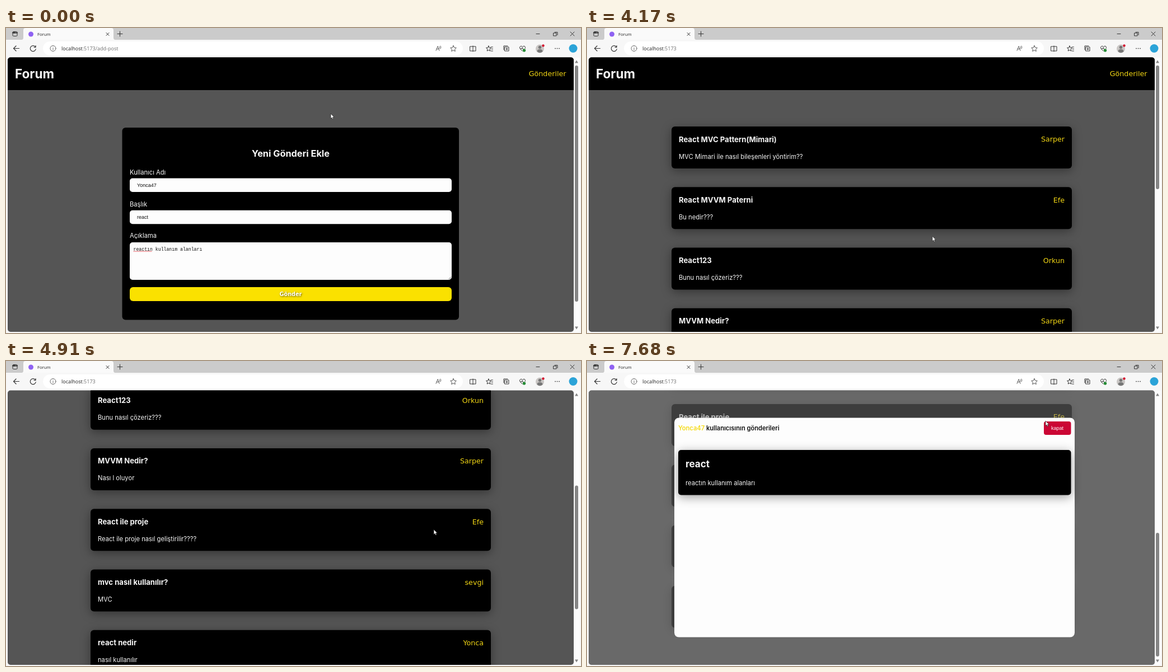
Write an HTML page that moves like this. It is 1027x545 px and loops after 8 s.

```html
<!DOCTYPE html>
<html lang="tr">
<head>
<meta charset="utf-8">
<title>Forum</title>
<style>
  html, body { margin: 0; height: 100%; overflow: hidden; background: #f7f7f7; }
  svg { display: block; width: 100vw; height: 100vh; }
  text { font: 11.2px Inter, sans-serif; fill: #f7f7f7; white-space: pre; }
  .ui { font: 9px "Open Sans", sans-serif; fill: #222; }
  .ui tspan { fill: #707070; }
  .title { font-weight: 700; font-size: 13.1px; }
  .link { font: 12.7px "DejaVu Sans", sans-serif; fill: #f0d414; text-anchor: end; }
  .field { font: 9px "Liberation Sans", Arial, sans-serif; fill: #111; }
  .mono { font: 8.2px "Liberation Mono", monospace; fill: #111; }
  .mid { text-anchor: middle; }
  .shadow { filter: drop-shadow(0 4px 9px rgba(0, 0, 0, .38)); }
  .icon { fill: none; stroke: #333; stroke-width: 1; stroke-linecap: round; stroke-linejoin: round; }
  #send text { font: 700 9.7px "DejaVu Sans", sans-serif; fill: #fff; text-shadow: 1px 1px 3px rgba(0, 0, 0, .6); }
</style>
</head>
<body>
<svg viewBox="0 0 1027 545">
  <defs>
    <clipPath id="view"><rect x="3" y="52.5" width="1011" height="490.5" rx="5"/></clipPath>
  </defs>

  <!-- browser chrome -->
  <rect width="1027" height="545" fill="#f7f7f7"/>
  <rect width="1027" height="21" fill="#cbcbcb"/>
  <path d="M28 21q3 0 3-4V4q0-4 4-4H188q4 0 4 4v13q0 4 3 4z" fill="#fafafa"/>
  <rect x="66" y="24" width="750" height="25" rx="12.5" fill="#fff"/>
  <circle cx="44.5" cy="11" r="4.5" fill="#8f62f2"/>
  <text class="ui" x="56" y="13.6" style="font-size:7.7px">Forum</text>
  <text class="ui" x="99" y="40">localhost<tspan id="path"></tspan></text>
  <g class="icon">
    <rect x="12" y="6.500" width="8" height="8" rx="1.500"/>
    <path d="M12 8.500h8M14.500 7v2" stroke-width="2"/>
    <path d="M179 8.500l5 5m0-5l-5 5M203.500 6v9M199 10.500h9M947 10.500h6M1008 7l7 7m0-7l-7 7"/>
    <path d="M978 9h5v5h-5zM980 7.500h5v5"/>
    <path d="M23.500 36.500h-10m4.500-4.500l-4.500 4.500 4.500 4.500" stroke-width="1.200"/>
    <path d="M52.500 34a5 5 0 1 0 .7 3.500M53 31.500v3h-3" stroke-width="1.200"/>
    <g stroke="#666">
      <circle cx="84" cy="36.500" r="5"/>
      <path d="M84 36v3M84 33.900v.1"/>
      <path d="M768 40.500l3-8 3 8m-5-3h4M774 33q1.500 1.500 0 3.500M776 32q2 2.500 0 5"/>
    </g>
    <path id="star" d="M799 31.500l1.600 3.400 3.700.5-2.700 2.500.7 3.700-3.300-1.800-3.300 1.800.7-3.700-2.700-2.500 3.700-.5z" stroke="#555"/>
    <path d="M834 32v10m-5-9h10v8h-10z"/>
    <path d="M862 32l1.300 3 3.200.4-2.400 2 .6 3.600-2.700-1.500-2.700 1.500.6-3.600-2.400-2 3.200-.4zM866 34h3.500M867 37.500h2.500M866 41h3.500"/>
    <path d="M891 34h7v7h-7zM889 39v-7h7M894.500 35.800v3.400m-1.700-1.700h3.400"/>
    <path d="M922 41l-4-4.200q-1.500-3 1-4.300 2-.7 3.500 1.300 1.500-2 3.500-1.300 2.500 1.300 1 4.300M919 37h2l1-2 1.500 3"/>
    <path d="M981 36.500h.1m3.400 0h.1m3.400 0h.1" stroke-width="1.700"/>
  </g>
  <circle cx="925.500" cy="40" r="2.700" fill="#258b35"/>
  <circle cx="953.500" cy="37" r="7.500" fill="#c9c6c4"/>
  <path d="M948.500 42q0-4 5-4t5 4q-5 4.500-10 0z" fill="#777"/>
  <circle cx="953.500" cy="34.500" r="2.700" fill="#777"/>
  <circle cx="959.500" cy="31.500" r="2.200" fill="#d3122f"/>
  <circle cx="1013" cy="36.500" r="7.500" fill="#2ba3d8"/>

  <!-- scrollbar -->
  <rect x="1014" y="53" width="11" height="490" fill="#fcfcfc"/>
  <path d="M1016 62.500l3-5 3 5zM1016 533.500l3 5 3-5z" fill="#858585"/>
  <rect id="thumb" x="1016" width="6" rx="3" fill="#858585"/>

  <!-- page -->
  <g clip-path="url(#view)">
    <rect y="52" width="1027" height="493" fill="#555"/>
    <g id="page">
      <rect y="52" width="1027" height="59"/>
      <text x="16" y="89.700" style="font-weight:700;font-size:22.500px">Forum</text>
      <text class="link" x="1000.500" y="86.300">Gönderiler</text>
      <g id="form">
        <rect x="207.500" y="178" width="601.500" height="343.500" rx="6"/>
        <text class="title mid" x="508.500" y="229.500" style="font-size:16.300px">Yeni Gönderi Ekle</text>
        <text x="221" y="261.500">Kullanıcı Adı</text>
        <text x="221" y="318.500">Başlık</text>
        <text x="221" y="375.300">Açıklama</text>
        <g fill="#fdfdfd">
          <rect x="221" y="268.500" width="575" height="24.500" rx="5"/>
          <rect x="221" y="325.700" width="575" height="24.500" rx="5"/>
          <rect x="221" y="383" width="575" height="67" rx="5"/>
        </g>
        <text class="field" x="234" y="283.700">Yonca47</text>
        <text class="field" x="234" y="340.500">react</text>
        <text class="mono" x="227.500" y="397.500">reactın kullanım alanları</text>
        <path id="squiggle" fill="none" stroke="#e0303a" stroke-width=".8"/>
        <path d="M790.500 449l4.500-4.500m-1.800 4.500l1.800-1.800" stroke="#555" stroke-width=".8"/>
        <g id="send">
          <rect x="221" y="463" width="575" height="25" rx="6" fill="#fae100"/>
          <text class="mid" x="508.500" y="479.200">Gönder</text>
        </g>
      </g>
      <g id="list"></g>
    </g>
    <g id="modal">
      <rect y="52" width="1027" height="493" fill="rgba(128,128,128,.48)"/>
      <rect x="156" y="101.500" width="715" height="392" rx="8" fill="#fdfdfd"/>
      <text x="163" y="124" style="font-weight:600;font-size:11.100px;fill:#111"><tspan fill="#f5db18">Yonca47</tspan> kullanıcısının gönderileri</text>
      <rect x="816" y="108" width="48.500" height="24" rx="4" fill="#cb0634"/>
      <text class="field mid" x="840" y="122.700" style="fill:#fff">kapat</text>
      <rect class="shadow" x="163" y="159" width="701.500" height="80.500" rx="5"/>
      <text class="title" x="176" y="190" style="font-size:17px">react</text>
      <text x="176" y="222">reactın kullanım alanları</text>
    </g>
  </g>

  <!-- pointers, each with its hot spot at 0,0 -->
  <g id="pointer" stroke="#222" stroke-width=".7" stroke-linejoin="round" fill="#fff">
    <path id="arrow" d="M0 0v8.800l2-1.800 1.400 3 1.500-.7-1.400-2.900h2.700z"/>
    <path id="hand" d="M-1 .5q1-1.300 2 0v4l3.300.8q1.200.4 1 1.800l-.8 4.900h-5l-3-4q-.5-1.200.8-1.200l1.700 1.200z"/>
  </g>
</svg>

<script>
const LOOP = 8000, MAX_SCROLL = 532;
const PRESS = 3070, SENT = 3140, MODAL = 6110;
const $ = id => document.getElementById(id);
const show = (id, on) => $(id).setAttribute('display', on ? 'inline' : 'none');

const posts = [
  ['React MVC Pattern(Mimari)', 'MVC Mimari ile nasıl bileşenleri yöntirim??', 'Sarper'],
  ['React MVVM Paterni', 'Bu nedir???', 'Efe'],
  ['React123', 'Bunu nasıl çözeriz???', 'Orkun'],
  ['MVVM Nedir?', 'Nası l oluyor', 'Sarper'],
  ['React ile proje', 'React ile proje nasıl geliştirilir????', 'Efe'],
  ['mvc nasıl kullanılır?', 'MVC', 'sevgi'],
  ['react nedir', 'nasıl kullanılır', 'Yonca'],
  ['react', 'reactın kullanım alanları', 'Yonca47']
];
$('list').innerHTML = posts.map(([title, body, user], i) => `
  <g transform="translate(151 ${176 + i * 108.25})">
    <rect class="shadow" width="715" height="75" rx="6"/>
    <text class="title" x="13" y="27.500">${title}</text>
    <text x="13" y="57.500">${body}</text>
    <text class="link" x="702" y="27.300">${user}</text>
  </g>`).join('');
$('squiggle').setAttribute('d', 'M227.500 400' + 'l1.500-1.500 1.500 1.500'.repeat(11));

// Keys are [time, ...values]
const scrollKeys = [[4380, 0], [4510, 95], [4770, 290], [4840, 290], [4910, 344], [5160, MAX_SCROLL]];
const pointerKeys = [
  [570, 580, 153], [840, 586, 195], [1200, 586, 195], [1810, 603, 456],
  [1970, 592, 476], [2010, 592, 476], [2240, 556, 482], [3340, 556, 482],
  [3540, 580, 435], [3970, 580, 435], [4510, 679, 266], [4770, 736, 288],
  [4840, 746, 292], [4910, 764, 301], [5580, 826, 408], [6050, 826, 408],
  [6080, 826, 405], [6180, 826, 395], [6610, 826, 395], [6640, 823, 257],
  [7110, 823, 257], [7140, 821, 180], [7640, 821, 180], [7680, 819, 107]
];

function at(keys, t) {
  const i = keys.findIndex(k => k[0] > t);
  if (i < 0) return keys[keys.length - 1].slice(1);
  if (i === 0) return keys[0].slice(1);
  const a = keys[i - 1], b = keys[i], f = (t - a[0]) / (b[0] - a[0]);
  return a.slice(1).map((v, n) => v + (b[n + 1] - v) * f);
}

function draw() {
  const t = performance.now() % LOOP;
  const sent = t >= SENT;
  const [scroll] = at(scrollKeys, t);
  const [x, y] = at(pointerKeys, t);
  const hover = !sent && y >= 463;

  $('path').textContent = sent ? ':5173' : ':5173/add-post';
  show('form', !sent);
  show('list', sent);
  show('modal', t >= MODAL);
  show('hand', hover);
  show('arrow', !hover);
  $('page').setAttribute('transform', `translate(0 ${-scroll})`);
  $('thumb').setAttribute('y', 67 + scroll / MAX_SCROLL * 240);
  $('thumb').setAttribute('height', sent ? 221 : 422);
  $('send').setAttribute('transform', t >= PRESS
    ? 'translate(508.5 475.5) scale(.95) translate(-508.5 -475.5)' : '');
  $('pointer').setAttribute('transform', `translate(${x} ${y})`);
  requestAnimationFrame(draw);
}
draw();
</script>
</body>
</html>
```
